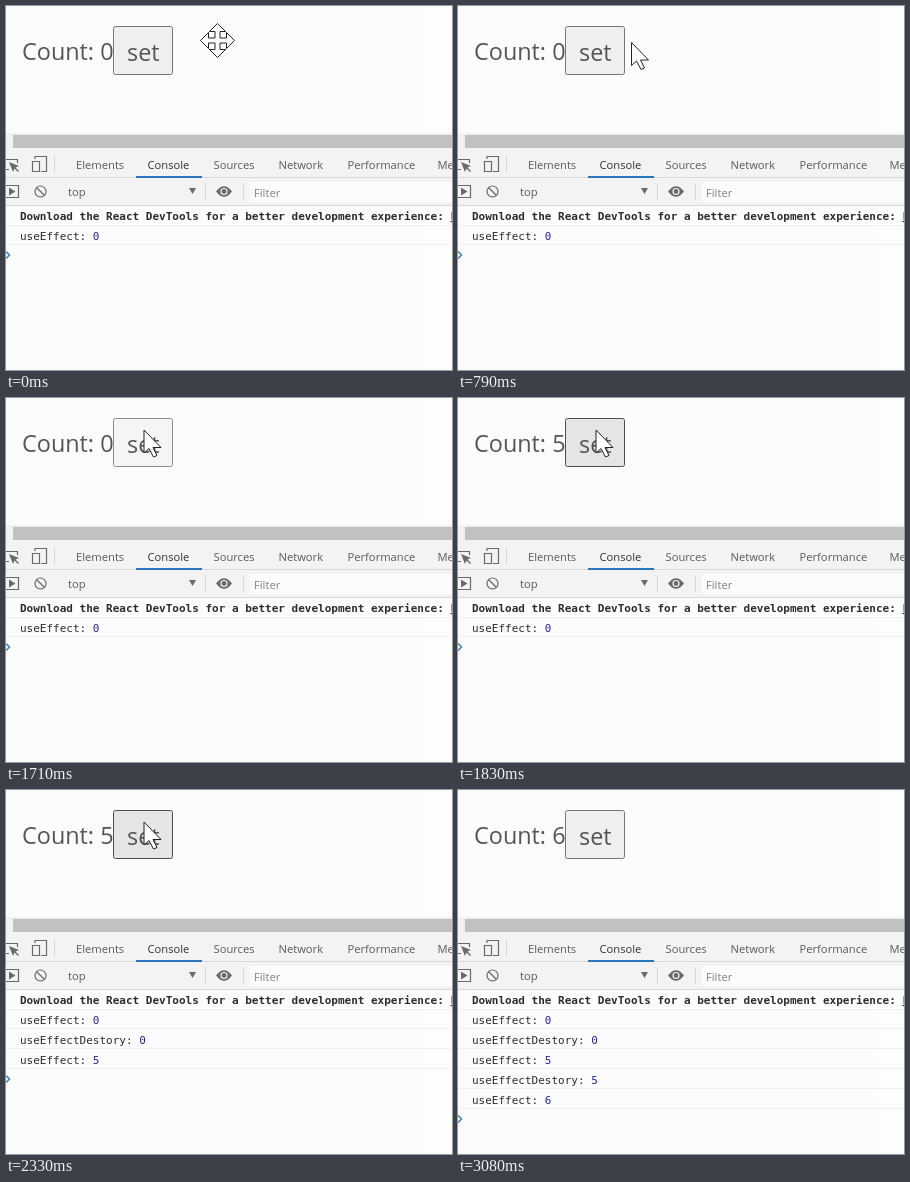
Animation of 446 by 364 pixels, one loop 4290 ms. Source, as an HTML page:

```html
<!DOCTYPE html>
<html lang="en">
<head>
<meta charset="utf-8">
<title>Effect counter</title>
<style>
  html, body { margin: 0; width: 100%; height: 100%; overflow: hidden; background: #fcfcfe; }
  svg { display: block; }
  text { white-space: pre; }
  .page { font: 23.4px "Open Sans", "Noto Sans", sans-serif; fill: #555; }
  .tools { font: 11.2px "Open Sans", "Noto Sans", sans-serif; fill: #5a5a5a; }
  .log { font: 11px "DejaVu Sans Mono", monospace; fill: #2b2b2b; }
  .icon { fill: none; stroke: #6a6a6a; stroke-width: 1.2; }
  .solid { fill: #6a6a6a; stroke: none; }
  .rule { stroke: #d8d8d8; }
  .row-line { stroke: #f0f0f0; }
  .cursor { fill: #fff; stroke: #222; }
</style>
</head>
<body>
<svg width="446" height="364" viewBox="0 0 446 364">
  <rect width="446" height="364" fill="#fcfcfe"/>
  <rect x="417" width="29" height="364" fill="#fdfdfc"/>

  <g class="page">
    <text id="count" x="16" y="54"></text>
    <rect id="button" x="107.5" y="20.5" width="59" height="48" rx="2"/>
    <text x="121" y="55">set</text>
  </g>

  <rect y="127" width="446" height="15" fill="#f1f1f1"/>
  <rect x="7" y="129" width="439" height="13" fill="#c1c1c1"/>
  <rect y="142" width="446" height="57" fill="#f3f3f3"/>
  <path class="rule" d="M0 171.5H446M0 199.5H446M48.5 149V167M199.5 177V194M237.5 177V194"/>
  <rect x="130" y="170" width="66" height="2" fill="#2c75bd"/>
  <rect x="244" y="176" width="202" height="20" fill="#fcfcfe"/>

  <g class="tools">
    <text x="70" y="163">Elements</text>
    <text x="141.5" y="163" fill="#333">Console</text>
    <text x="207.5" y="163">Sources</text>
    <text x="272.5" y="163">Network</text>
    <text x="341.5" y="163">Performance</text>
    <text x="431.5" y="163">Memory</text>
    <text x="62" y="190">top</text>
    <text x="248" y="191" fill="#808080">Filter</text>
  </g>

  <g class="icon">
    <path d="M0 153.5H11.5V157M0 163.5H3"/>
    <path class="solid" d="M3 156L13 160L9.5 161.5L13 165L12 166L8.5 162.5L7 166Z"/>
    <path d="M29 153V150.5H40.5V165.5H35M26.5 155.5H33.5V165.5H26.5Z"/>
    <path d="M0 179.5H12.5V191.5H0"/>
    <path class="solid" d="M3 181.5L9.5 185.5L3 189.5ZM183 182H190L186.5 188Z"/>
    <circle cx="34.5" cy="185.5" r="5.5"/>
    <path d="M30.5 181.5L38.5 189.5"/>
    <path class="solid" d="M210 185.5Q218 175 226 185.5Q218 196 210 185.5Z"/>
    <circle cx="218" cy="185.5" r="3" stroke="#f3f3f3"/>
  </g>

  <g class="log">
    <text x="14" y="214" font-weight="bold">Download the React DevTools for a better development experience: <tspan font-weight="normal" text-decoration="underline">h</tspan></text>
    <path class="row-line" d="M0 219.5H446"/>
    <g id="rows"></g>
  </g>
  <path id="prompt" fill="none" stroke="#397fb9" stroke-width="1.5" d="M0 -3.500L3.500 0L0 3.500"/>

  <path id="move" class="cursor" transform="translate(211.5 34.5)"
    d="M0 -17L8 -9H2.5V-2.5H9V-8L17 0L9 8V2.5H2.5V9H8L0 17L-8 9H-2.5V2.5H-9V8L-17 0L-9 -8V-2.5H-2.5V-9H-8Z"/>
  <path id="arrow" class="cursor" d="M0 0V23L5 18.5L9.5 27L13 25.5L9 17.5H17Z"/>
</svg>
<script>
const LOOP = 4290;
const PRESS = { from: 1710, to: 1800 };
const HOVER = { from: 870, to: 2790 };
const counts = [[0, 0], [1800, 5], [2790, 6]];
const rowCounts = [[0, 1], [1880, 3], [2880, 5]];
const arrowPath = [[790, 173.5, 36.5], [830, 161.5, 43.5], [880, 146.5, 38.5], [960, 138, 32]];
const messages = [
  ["useEffect", 0], ["useEffectDestory", 0], ["useEffect", 5],
  ["useEffectDestory", 5], ["useEffect", 6],
];
const styles = {
  idle: ["#efefef", "#767676"],
  hover: ["#e5e5e5", "#4f4f4f"],
  press: ["#f5f5f5", "#8d8d8d"],
};

const el = id => document.getElementById(id);
const show = (node, on) => node.setAttribute("visibility", on ? "visible" : "hidden");
const within = (t, span) => t >= span.from && t < span.to;
const latest = (steps, t) => steps.filter(step => step[0] <= t).pop();

el("rows").innerHTML = messages.map(([label, value], i) => `<g>
  <text x="14" y="${234 + 20 * i}">${label}: <tspan fill="#2525a0">${value}</tspan></text>
  <path class="row-line" d="M0 ${238.5 + 20 * i}H446"/></g>`).join("");
const rows = [...el("rows").children];

function draw(t) {
  el("count").textContent = `Count: ${latest(counts, t)[1]}`;

  const state = within(t, PRESS) ? "press" : within(t, HOVER) ? "hover" : "idle";
  const [fill, stroke] = styles[state];
  el("button").setAttribute("fill", fill);
  el("button").setAttribute("stroke", stroke);

  const shown = latest(rowCounts, t)[1];
  rows.forEach((row, i) => show(row, i < shown));
  el("prompt").setAttribute("transform", `translate(0 ${229 + 20 * shown})`);

  const spot = latest(arrowPath, t);
  show(el("move"), !spot);
  show(el("arrow"), spot && t < HOVER.to);
  if (spot) el("arrow").setAttribute("transform", `translate(${spot[1]} ${spot[2]})`);
}

const start = performance.now();
function tick() {
  draw((performance.now() - start) % LOOP);
  requestAnimationFrame(tick);
}
tick();
</script>
</body>
</html>
```
